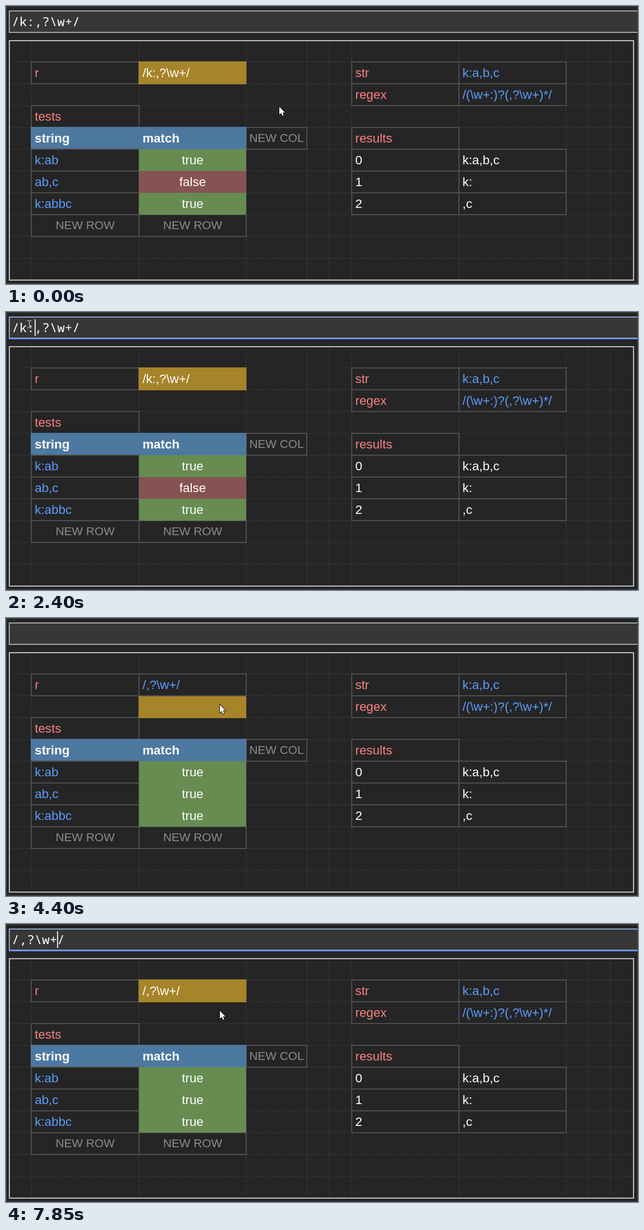
An HTML page with a canvas that plays this animation: 1126x497 px, repeating every 8 s.

```html
<!DOCTYPE html>
<html lang="en">
<head>
<meta charset="utf-8">
<title>Spreadsheet regex</title>
<style>
  html, body { margin: 0; width: 100%; height: 100%; overflow: hidden; background: #252525; }
  canvas { display: block; }
</style>
</head>
<body>
<canvas id="stage" width="1126" height="497"></canvas>
<script>
const ctx = document.getElementById('stage').getContext('2d');
const LOOP = 8000;
const SANS = '"Liberation Sans", Arial, sans-serif';
const MONO = '500 22.5px "Noto Sans Mono", monospace';
const COL = {
  page: '#252525', bar: '#373737', frame: '#bdbdbd', grid: '#3b3b3b', cell: '#4e4e4e',
  label: '#fc8080', value: '#5b9dff', plain: '#ffffff', hint: '#8c8c8c',
  select: '#a6842a', head: '#4d789f', yes: '#668c51', no: '#875252'
};
const X = [45, 237, 428, 536, 576, 616, 807, 998, 1038, 1077];
const rowY = r => Math.round(61 + r * 38.95);

const OLD = '/k:,?\\w+/', NEW = '/,?\\w+/';

// Each step changes part of the state from its time on.
const steps = [
  [0, { text: OLD, value: OLD, row: 1, focus: false, caret: -1, ptr: 'arrow', x: 487, y: 180 }],
  [590, { x: 141, y: 28 }],
  [740, { x: 70, y: 1 }],
  [870, { ptr: 'beam', x: 50, y: 3 }],
  [1010, { x: 40, y: 10 }],
  [1130, { x: 35, y: 14 }],
  [1400, { x: 38, y: 14 }],
  [1530, { x: 41, y: 14 }],
  [2400, { focus: true, caret: 3 }],
  [2520, { x: 324, y: 120 }],
  [2670, { ptr: 'arrow', x: 381, y: 155 }],
  [2950, { caret: -1 }],
  [3100, { text: NEW }],
  [3510, { caret: 1 }],
  [3970, { caret: -1 }],
  [4400, { text: '', value: NEW, row: 2, focus: false }],
  [6110, { text: NEW, row: 1 }],
  [7420, { focus: true, caret: 7 }],
  [7850, { caret: 6 }]
];

function stateAt(t) {
  return Object.assign({}, ...steps.filter(s => s[0] <= t).map(s => s[1]));
}

function rect(color, x, y, w, h) {
  ctx.fillStyle = color;
  ctx.fillRect(x, y, w, h);
}

function outline(color, x, y, w, h) {
  ctx.strokeStyle = color;
  ctx.lineWidth = 2;
  ctx.strokeRect(x, y, w, h);
}

function write(str, x, y, color, font = '22.4px ' + SANS, align = 'left') {
  ctx.font = font;
  ctx.textAlign = align;
  ctx.fillStyle = color;
  ctx.fillText(str, x, y);
}

const border = (c, r) => outline(COL.cell, X[c], rowY(r), X[c + 1] - X[c], rowY(r + 1) - rowY(r));
const paint = (color, c, r) =>
  rect(color, X[c] - 1, rowY(r) - 1, X[c + 1] - X[c] + 1, rowY(r + 1) - rowY(r) + 2);
const put = (str, c, r, color, font) => write(str, X[c] + 6.2, rowY(r) + 27, color, font);
const center = (str, c, r, color, font, dy = 27) =>
  write(str, (X[c] + X[c + 1]) / 2, rowY(r) + dy, color, font, 'center');

function cell(str, c, r, color) {
  border(c, r);
  put(str, c, r, color);
}

function hint(str, c, r) {
  border(c, r);
  center(str, c, r, COL.hint, '20.8px ' + SANS, 26);
}

function dotted(x1, y1, x2, y2) {
  ctx.beginPath();
  ctx.moveTo(x1, y1);
  ctx.lineTo(x2, y2);
  ctx.stroke();
}

function drawGrid() {
  ctx.strokeStyle = COL.grid;
  ctx.lineWidth = 1.6;
  ctx.setLineDash([1.6, 1.6]);
  X.forEach(x => dotted(x, 62, x, 489));
  for (let r = 1; r <= 10; r++) dotted(7, rowY(r), 1117, rowY(r));
  ctx.setLineDash([]);
}

function drawBar(s) {
  rect(COL.frame, 5, 8, 1121, 40);
  rect(COL.bar, 6.6, 9.6, 1120, 36.8);
  if (s.focus) {
    rect('#8aa9dc', 5, 8, 1121, 1.6);
    rect('#8aa9dc', 5, 8, 1.6, 40);
    rect('#b4c2d8', 6, 46, 1120, 1);
    rect('#4687ea', 5, 47, 1121, 2);
  }
  write(s.text, 10.2, 36, COL.plain, MONO);
  if (s.caret >= 0) rect(COL.plain, Math.round(9.9 + 13.55 * s.caret), 13, 1.7, 30);
}

function drawTables(s) {
  cell('r', 0, 1, COL.label);
  cell('tests', 0, 3, COL.label);
  border(1, 1);
  if (s.row === 2) rect(COL.select, 236, 140, 192, 39);
  else paint(COL.select, 1, 1);
  put(s.value, 1, 1, s.row === 1 ? COL.plain : COL.value);

  hint('NEW COL', 2, 4);
  ['string', 'match'].forEach((name, c) => {
    hint('NEW ROW', c, 8);
    paint(COL.head, c, 4);
    put(name, c, 4, COL.plain, 'bold 22.4px ' + SANS);
  });
  ['k:ab', 'ab,c', 'k:abbc'].forEach((str, i) => {
    const ok = i !== 1 || s.value === NEW;
    cell(str, 0, 5 + i, COL.value);
    rect(ok ? COL.yes : COL.no, 237, rowY(5 + i), 191, 39);
    center(String(ok), 1, 5 + i, COL.plain);
  });

  cell('str', 5, 1, COL.label);
  cell('k:a,b,c', 6, 1, COL.value);
  cell('regex', 5, 2, COL.label);
  cell('/(\\w+:)?(,?\\w+)*/', 6, 2, COL.value);
  cell('results', 5, 4, COL.label);
  ['k:a,b,c', 'k:', ',c'].forEach((str, i) => {
    cell(String(i), 5, 5 + i, COL.plain);
    cell(str, 6, 5 + i, COL.plain);
  });
}

function drawPointer({ ptr, x, y }) {
  ctx.save();
  ctx.translate(x, y);
  if (ptr === 'beam') {
    ctx.globalCompositeOperation = 'difference';
    rect('#fff', 0, 2, 1.2, 12);
    rect('#fff', -3.5, 1, 3.5, 1.2);
    rect('#fff', 1.2, 1, 3.5, 1.2);
    rect('#fff', -3.5, 13.8, 3.5, 1.2);
    rect('#fff', 1.2, 13.8, 3.5, 1.2);
  } else {
    const arrow = new Path2D('M0 0V14.2L3.3 11.2L5.6 16.3L7.8 15.3L5.6 10.4H10Z');
    ctx.strokeStyle = '#000';
    ctx.lineWidth = 1.6;
    ctx.stroke(arrow);
    ctx.fillStyle = '#fff';
    ctx.fill(arrow);
  }
  ctx.restore();
}

function draw(now) {
  const s = stateAt(now % LOOP);
  rect(COL.page, 0, 0, 1126, 497);
  drawBar(s);
  drawGrid();
  drawTables(s);
  outline(COL.frame, 6, 62, 1112, 428);
  ctx.strokeStyle = '#4c4c4c';
  ctx.lineWidth = 1;
  ctx.strokeRect(0.5, 0.5, 1125, 496);
  drawPointer(s);
}

const start = performance.now();
(function frame() {
  draw(performance.now() - start);
  requestAnimationFrame(frame);
})();
</script>
</body>
</html>
```
